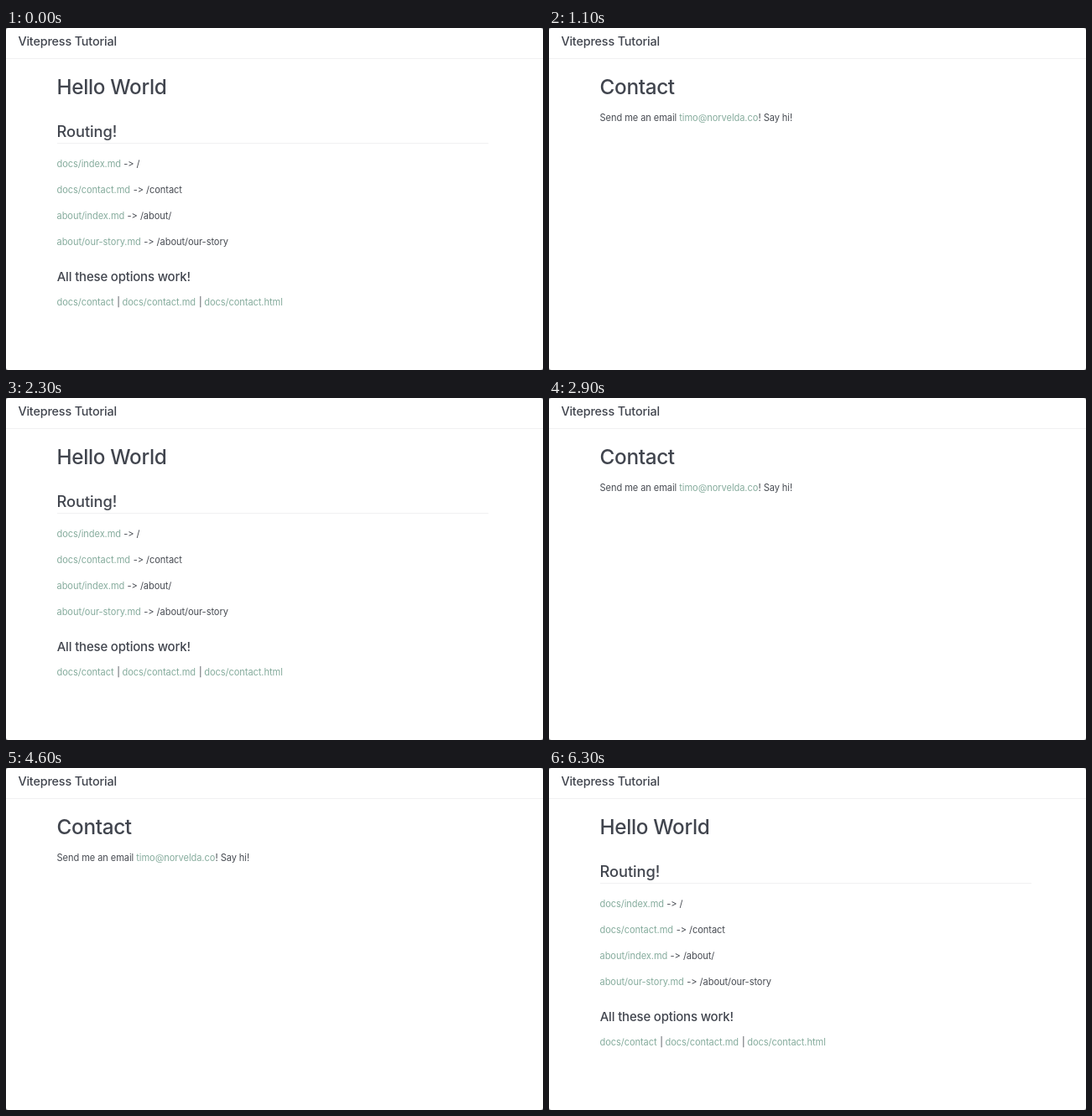
An HTML page that plays this animation: 640 by 408 pixels, repeating every 6500 ms.

```html
<!DOCTYPE html>
<html lang="en">
<head>
<meta charset="utf-8">
<title>Vitepress Tutorial</title>
<style>
  html, body { margin: 0; width: 100%; height: 100%; overflow: hidden; background: #8a8a8c; }
  svg { display: block; width: 640px; height: 408px; background: #fff; border-radius: 3px; }
  text {
    font: 400 11.07px Inter, "Liberation Sans", sans-serif;
    font-optical-sizing: none;
    font-variant-ligatures: none;
    font-feature-settings: "calt" 0;
    letter-spacing: -.006em;
    fill: #474b52;
    white-space: pre;
  }
  .title, .h1, .h2, .h3 { font-weight: 550; fill: #41454e; }
  .title { font-size: 14.4px; letter-spacing: -.012em; }
  .h1 { font-size: 24.3px; letter-spacing: -.014em; }
  .h2 { font-size: 18.3px; letter-spacing: -.005em; }
  .h3 { font-size: 14.95px; letter-spacing: -.011em; }
  .link { fill: #86ac9d; }
  .rule { fill: #f1f1f2; }
</style>
</head>
<body>
<svg viewBox="0 0 640 408">
  <rect class="rule" y="36" width="640" height="1"/>
  <text class="title" x="14.4" y="21">Vitepress Tutorial</text>

  <g id="home">
    <text class="h1" x="60.6" y="79">Hello World</text>
    <text class="h2" x="60.6" y="129.8">Routing!</text>
    <rect class="rule" x="61" y="137" width="514" height="1"/>
    <text y="166.2"><tspan class="link" x="60.5">docs/index.md</tspan><tspan x="140.2">-&gt; /</tspan></text>
    <text y="197.1"><tspan class="link" x="60.5">docs/contact.md</tspan><tspan x="151.8">-&gt; /contact</tspan></text>
    <text y="228"><tspan class="link" x="60.5">about/index.md</tspan><tspan x="144.6">-&gt; /about/</tspan></text>
    <text y="258.8"><tspan class="link" x="60.5">about/our-story.md</tspan><tspan x="164.3">-&gt; /about/our-story</tspan></text>
    <text class="h3" x="60.7" y="302">All these options work!</text>
    <text y="331"><tspan class="link" x="60.5">docs/contact</tspan><tspan x="132.2">|</tspan><tspan class="link" x="138.5">docs/contact.md</tspan><tspan x="229.9">|</tspan><tspan class="link" x="236.3">docs/contact.html</tspan></text>
  </g>

  <g id="contact">
    <text class="h1" x="60.6" y="79">Contact</text>
    <text y="110.8"><tspan x="60.5">Send me an email</tspan><tspan class="link" x="155.3">timo@norvelda.co</tspan><tspan x="249.5">! Say hi!</tspan></text>
  </g>
</svg>
<script>
  const LOOP = 6500;
  // Times during which the contact page is open
  const visits = [[1100, 1900], [2800, 3500], [4600, 5700]];
  const home = document.getElementById('home');
  const contact = document.getElementById('contact');

  function draw() {
    const t = performance.now() % LOOP;
    const open = visits.some(([from, to]) => t >= from && t < to);
    home.style.display = open ? 'none' : '';
    contact.style.display = open ? '' : 'none';
    requestAnimationFrame(draw);
  }
  draw();
</script>
</body>
</html>
```
